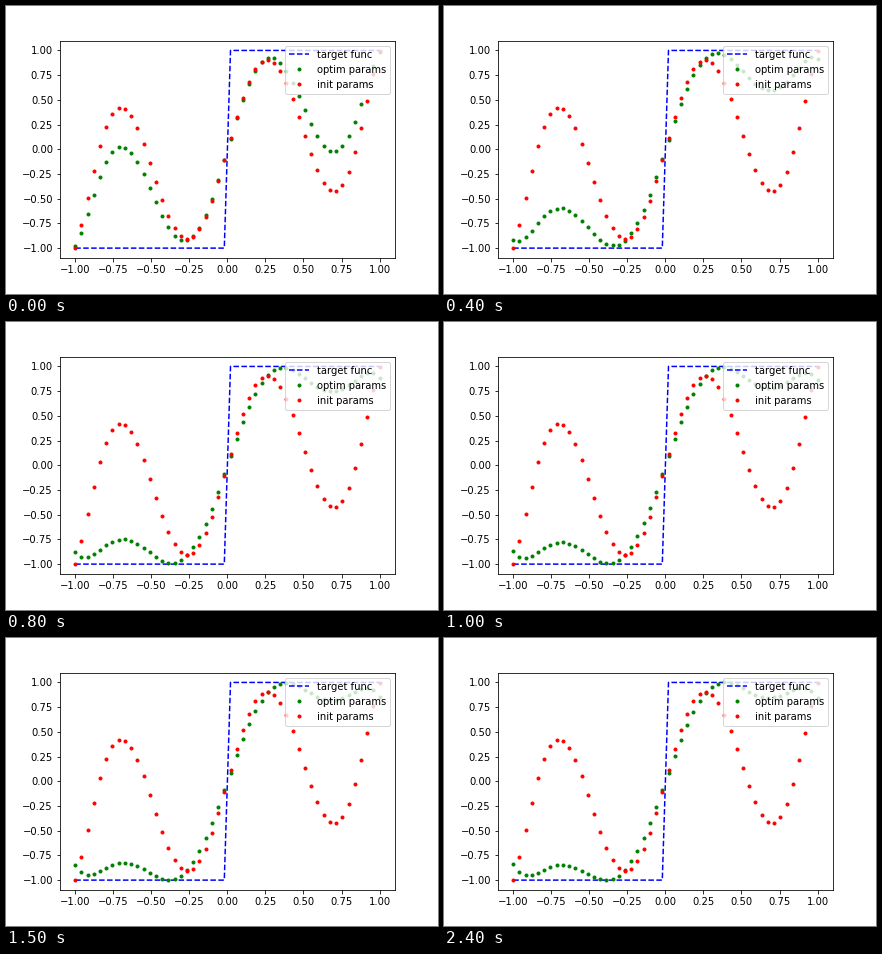
These frames come from a looping animation (432 px wide and 288 px high, 2500 ms). A matplotlib script:

```python
import numpy as np
import matplotlib.pyplot as plt
from matplotlib.animation import FuncAnimation
from numpy.polynomial.chebyshev import chebvander

STEPS = 25
FAST, SLOW = .6, .84  # error left over per training step

x = np.linspace(-1, 1, 50)
knots = x[[27, 33, 38, 43, 46, 48, 49]]


def odd_basis(t):
    return chebvander(t, 13)[:, 1::2]


def odd_curve(*heights):
    """Smooth odd curve through the given heights at the knots."""
    return odd_basis(x) @ np.linalg.solve(odd_basis(knots), heights)


init = odd_curve(.521, .796, -.05, -.357, .218, .766, .997)
final = odd_curve(.421, .988, .911, .873, .948, .917, .838)
lag = odd_curve(.085, 0, -.335, -.44, -.2, .072, .196)


def model(step):
    """Relax from init to final; the lag part of the error fades slowly."""
    n = step + 1
    return final + lag * SLOW**n + (init - final - lag) * FAST**n


fig, ax = plt.subplots(figsize=(6, 4), dpi=72)
fig.subplots_adjust(left=.125, right=.9, bottom=.125, top=.88)
ax.plot(x, np.sign(x), "b--", label="target func")
optim, = ax.plot(x, model(0), "g.", label="optim params")
ax.plot(x, init, "r.", label="init params")
ax.set_xlim(-1.1, 1.1)
ax.set_ylim(-1.1, 1.1)
ax.legend(loc="upper right")


def update(step):
    optim.set_ydata(model(step))
    return optim,


anim = FuncAnimation(fig, update, frames=STEPS, interval=100, repeat=True, repeat_delay=0)
plt.show()
```
